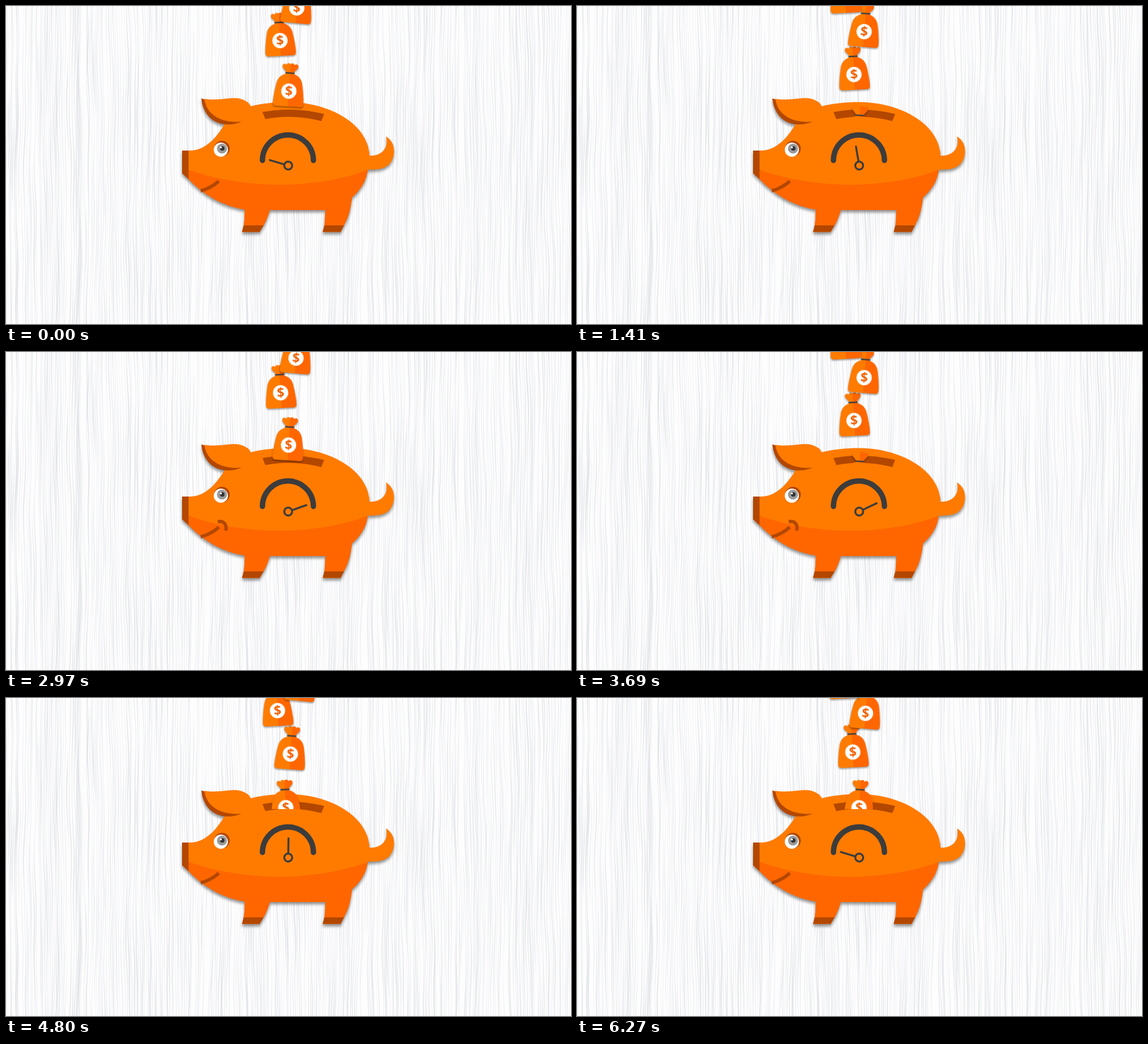
Write an HTML page with a canvas that moves like this. It is 998 px wide and 561 px high and loops after 6.3 s.

```html
<!DOCTYPE html>
<html lang="en">
<head>
<meta charset="utf-8">
<title>Piggy bank</title>
<style>
  html, body { margin: 0; width: 100%; height: 100%; overflow: hidden; background: #fdfdfd; }
  canvas, svg { position: absolute; left: 0; top: 0; width: 998px; height: 561px; display: block; }
  .pig { filter: drop-shadow(0 4px 2.5px rgba(0, 0, 0, .42)); }
  .bag { filter: drop-shadow(0 2px 1.5px rgba(0, 0, 0, .38)); }
  .main { fill: #ff7b00; }
  .deep { fill: #ff6600; }
  .dark { fill: #b34700; }
  .line { fill: none; stroke: #3c3c3c; stroke-linecap: round; }
  .smile { fill: none; stroke: #b34700; stroke-width: 6; }
  .eye { transform-origin: 380px 254px; }
  text { font: 700 23px "Open Sans", "Noto Sans", sans-serif; fill: #f06000; text-anchor: middle; }
</style>
</head>
<body>
<canvas id="wood" width="998" height="561"></canvas>
<svg viewBox="0 0 998 561">
  <defs>
    <path id="body" d="M311,255 H323 C352,256 371,232 384,212 L396,190 L432,177
      C450,172 475,169.5 498,169.5 C577,170 641,212 642,264
      C662,265 677,252 671,230 C690,241 688,266 678,278 C668,289 655,288 639,289
      C636,312 624,326 611,338 C609,360 604,374 597,387 L591,398.5 H559.5 L562.5,387 Q564,373 564,360
      H466 Q462,375 455,387 L448,398.5 H417 L420,387 Q422,373 421.5,359
      C385,353 352,336 323,306 L311,295 Z"/>
    <clipPath id="bodyClip"><use href="#body"/></clipPath>
    <clipPath id="aboveSlot"><rect width="998" height="196"/></clipPath>
    <clipPath id="rightHalf"><rect y="-60" width="40" height="100"/></clipPath>
    <g id="sack">
      <path d="M-7,-33 C-9,-38 -14,-40 -14,-44 C-14,-48 -9,-49 -7,-46 C-6,-50 -1,-50 0,-47
        C1,-50 6,-50 7,-46 C9,-49 14,-48 14,-44 C14,-40 9,-38 7,-33 Z"/>
      <path d="M-7,-34 H7 L8,-30 C17,-27 21,-21 22.5,-14 C24.5,-4 26.5,8 27,20 Q27.5,27 21,27
        H-21 Q-27.5,27 -27,20 C-26.5,8 -24.5,-4 -22.5,-14 C-21,-21 -17,-27 -8,-30 Z"/>
    </g>
    <g id="bag">
      <use href="#sack" class="main"/>
      <use href="#sack" class="deep" clip-path="url(#rightHalf)"/>
      <path class="line" stroke-width="2.6" d="M-7,-32 H7"/>
      <circle r="13.5" fill="#fff"/>
      <text y="8.2">$</text>
    </g>
  </defs>

  <g class="pig">
    <use href="#body" class="main"/>
    <g clip-path="url(#bodyClip)">
      <path class="deep" d="M300,280 L323,289 C420,324 550,324 642,288 V410 H300 Z"/>
      <path class="dark" d="M300,250 H322.5 V310 H300 Z M410,387 H610 V400 H410 Z"/>
    </g>
    <path class="dark" d="M345,163 C347,186 362,209 392,209 Q405,209 416,204 L400,180 Z"/>
    <path class="main" d="M345,163 C378,169 396,159 415,164 Q429,168 433,178 L416,204
      C380,207 354,192 350.5,164 Z"/>
  </g>

  <path class="dark" d="M453,187 Q508,177 562,190.5 L557,203 Q508,190 458,199.5 Z"/>

  <circle cx="381.5" cy="251.5" r="13.8" fill="#b34700"/>
  <g class="eye" id="eye">
    <circle cx="379.5" cy="253.5" r="12.5" fill="#fff"/>
    <circle cx="381.5" cy="251.5" r="8.8" fill="#9b9b9b"/>
    <circle cx="382" cy="251.3" r="4" fill="#333"/>
    <circle cx="379.5" cy="249.5" r="1.8" fill="#fff"/>
  </g>

  <path class="smile" d="M344,326 Q361,322 376,309"/>
  <path class="smile" id="cheek" pathLength="1" d="M374,299.5 C384,297.5 391,304 388,315"/>

  <path class="line" stroke-width="9.5" d="M453,272.5 A45,45 0 0 1 543,272.5"/>
  <g id="needle" class="line" stroke-width="3.4">
    <circle r="7"/>
    <path d="M-7.5,0 H-34"/>
  </g>

  <g id="bags" clip-path="url(#aboveSlot)"></g>
</svg>
<script>
const $ = id => document.getElementById(id);
const clamp = v => Math.min(1, Math.max(0, v));
const smooth = v => v * v * (3 - 2 * v);

const STEP = 30, STEPS = 210, TURN = 106;
const CYCLE = 14;  // steps between two bags of the same side
const BLINKS = [8, 40, 84];

// w is the square root of the drop; gain is its growth per cycle
const SIDES = [
  { start: .66, gain: 6.78, x: w => 497 + .134 * (18.6 - w) ** 2, tilt: w => 6.2 - .17 * w },
  { start: 3.58, gain: 7.05, x: w => 479.5 + 2.25 * (w - 8.6) - .022 * (w - 8.6) ** 2, tilt: () => -3 }
];

function drawWood() {
  const c = $('wood').getContext('2d');
  let seed = 11;
  const rnd = () => (seed = (seed * 16807) % 2147483647) / 2147483647;
  c.fillStyle = '#fdfdfe';
  c.fillRect(0, 0, 998, 561);
  // neighbouring lines share one slow wobble
  const sway = (x, y) => 1.7 * Math.sin(y / 80 + x / 37) + .8 * Math.sin(y / 33 + x / 19);
  for (let x = -6; x < 1004; x += 1.8 + rnd() * 3) {
    const whole = rnd() < .75;
    const from = whole ? -60 : rnd() * 350;
    const to = whole ? 620 : from + 150 + rnd() * 300;
    const phase = rnd() * 6.3, width = .4 + rnd() * .8;
    c.fillStyle = `rgba(198,202,206,${.25 + rnd() * .25})`;
    const left = [], right = [];
    for (let y = from; y <= to; y += 5) {
      const mid = x + sway(x, y) + .5 * Math.sin(y / 21 + phase);
      const taper = clamp((y - from) / 50) * clamp((to - y) / 50);
      const half = width * taper * (.7 + .35 * Math.sin(y / 46 + phase * 2));
      left.push([mid - half, y]);
      right.unshift([mid + half, y]);
    }
    c.beginPath();
    left.concat(right).forEach(p => c.lineTo(...p));
    c.fill();
  }
}

const bags = Array.from({ length: 6 }, (_, i) => {
  const el = document.createElementNS('http://www.w3.org/2000/svg', 'g');
  el.setAttribute('class', 'bag');
  el.innerHTML = '<use href="#bag"/>';
  return { el, side: SIDES[i % 2], lap: i >> 1 };
});

function placeBags(n) {
  for (const b of bags) {
    const { start, gain, x, tilt } = b.side;
    const w = b.w = (start + gain * n / CYCLE) % gain + gain * b.lap;
    b.el.setAttribute('transform', `translate(${x(w)} ${w * w - 52}) rotate(${tilt(w)})`);
  }
  // the higher bag lies in front
  bags.sort((a, b) => b.w - a.w).forEach(b => $('bags').append(b.el));
}

function render(ms) {
  const k = Math.floor(ms / STEP) % STEPS;
  const n = k <= TURN ? k : 2 * TURN - k;  // plays forward, then back
  placeBags(n);
  const angle = 16.5 + 144.5 * smooth(clamp(n / 102));
  $('needle').setAttribute('transform', `translate(498.5 281.5) rotate(${angle})`);
  const grown = smooth(clamp((n - 55) / 16));
  $('cheek').style.strokeDasharray = `${grown} 2`;
  $('cheek').style.visibility = grown ? 'visible' : 'hidden';
  const open = Math.min(1, ...BLINKS.map(b => Math.abs(n - b) / 3));
  $('eye').style.transform = `scaleY(${.08 + .92 * open})`;
}

drawWood();
const begin = performance.now();
function tick() {
  render(performance.now() - begin);
  requestAnimationFrame(tick);
}
tick();
</script>
</body>
</html>
```
